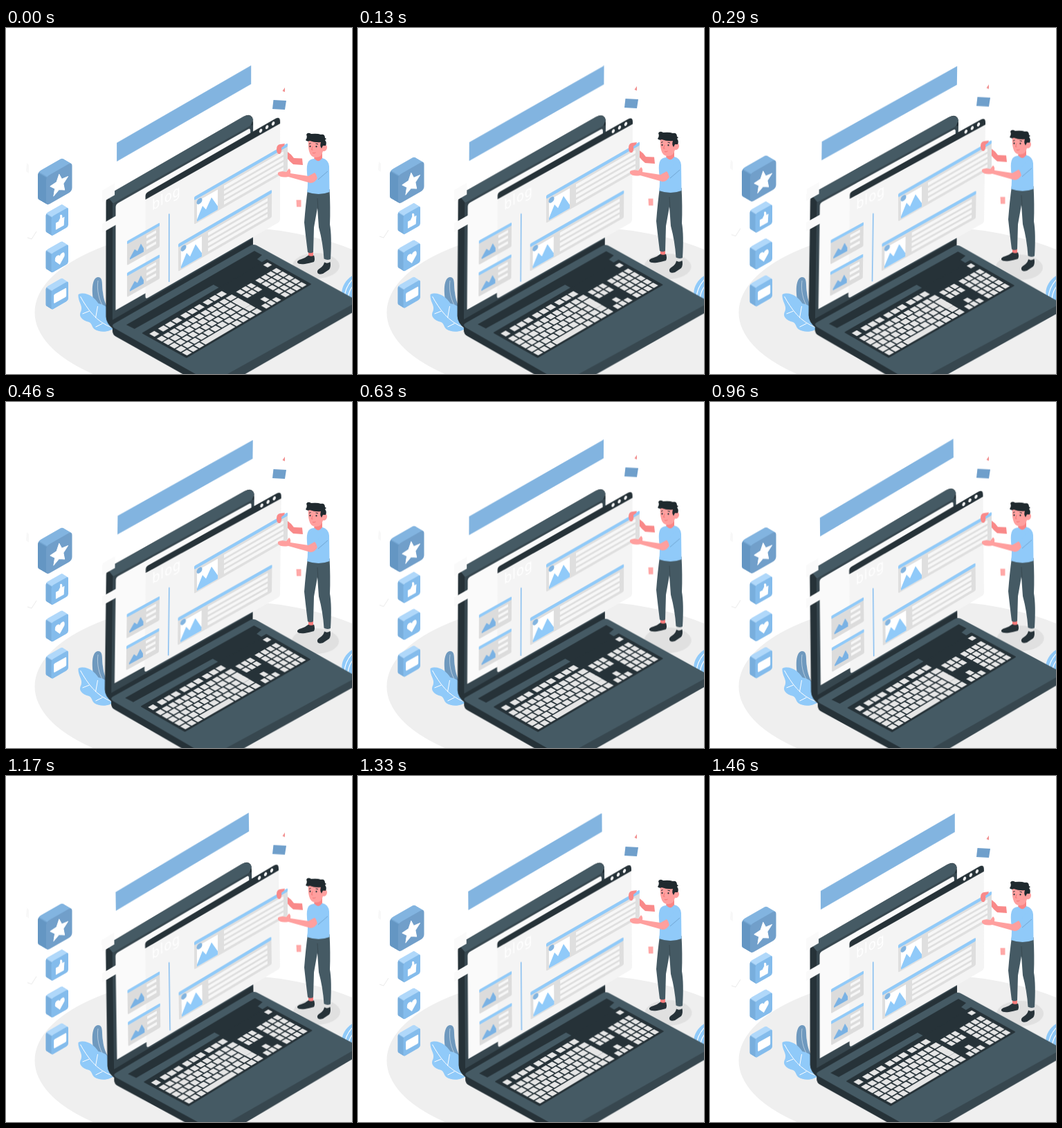
Animation, 500 px wide and 500 px high, one loop 1.5 s. Source, as an HTML page:

```html
<!DOCTYPE html>
<html lang="en">
<head>
<meta charset="utf-8">
<title>Page building</title>
<style>
  html, body { margin: 0; width: 100%; height: 100%; overflow: hidden; background: #fff; }
  svg { display: block; width: 100vw; height: 100vh; }
  #laptop { transform-origin: 283px 277px; }
</style>
</head>
<body>
<svg viewBox="0 0 500 500">
  <defs>
    <linearGradient id="dark" x1="0" y1="1" x2="1" y2="0">
      <stop offset=".48" stop-color="#6496c3"/><stop offset=".52" stop-color="#82b4e0"/>
    </linearGradient>
    <linearGradient id="pale" x1="0" y1="1" x2="1" y2="0">
      <stop offset=".48" stop-color="#78aedd"/><stop offset=".52" stop-color="#b0d8fa"/>
    </linearGradient>
  </defs>

  <ellipse cx="315" cy="411" rx="273.500" ry="123.500" fill="#efefef"/>

  <g id="plants">
    <path d="M126 392C123 374 126 360 133 360C141 360 138 372 140 382C141 392 144 400 148 406L136 408Z" fill="#6f99be"/>
    <path d="M133 365C131 378 134 394 142 405" fill="none" stroke="#fff" stroke-width=".8" opacity=".6"/>
    <g transform="translate(-.5 -1)">
      <path d="M105 386C115 381 128 389 134 399C145 401 152 408 153 420L160 432C151 441 137 442 128 436C123 431 126 427 117 425C107 421 106 415 109 410C112 402 104 396 105 386Z" fill="#90caf9"/>
      <path d="M108 389C118 407 131 426 154 434M121 410L111 414M130 420L133 403M140 428L130 433" fill="none" stroke="#fff" stroke-width="1"/>
    </g>
    <path d="M502 357C490 364 483 376 486 389L502 400Z" fill="#90caf9"/>
    <path d="M502 362Q490 374 489 390M502 372Q495 380 494 392" fill="none" stroke="#fff" stroke-width="1.2"/>
  </g>

  <g id="laptop">
    <ellipse cx="448" cy="343.500" rx="34" ry="18.500" fill="#e0e0e0"/>

    <!-- lid -->
    <path d="M144.500 252Q144.500 245 151 239L343 128Q357 121 357 137V318L156 436Q144.500 427 144.500 417Z" fill="#263238"/>
    <path d="M147 244Q149 241 152 238.500L343 128Q353 123 357 132L353 142L155 254Z" fill="#455a64"/>
    <path d="M154 254L353 141L357 140V304L154 422Z" fill="#37474f"/>
    <path d="M158.500 259Q158.500 255 162 253L350 146Q353 144 353 149V297L158.500 408Z" fill="#fafafa"/>

    <!-- base -->
    <path d="M154 430V438Q154 443 159 446L284 516L300 400Z" fill="#263238"/>
    <path d="M284 516H318L506 408V395L300 400Z" fill="#37474f"/>
    <path d="M157 427L352 315Q358 311 364 315L503 391Q508 395 503 398L304 509Q297 513 290 509L157 434Q151 430 157 427Z" fill="#455a64"/>
    <path d="M174 429L359 322L370 328L363 334L371 339L378 335L420 360L330 395L300 371L186 435Z" fill="#263238"/>
    <path d="M186 435L300 371L311 377L199 441Z" fill="#455a64"/>
    <path d="M198 441L377 335L440 370L261 476Z" fill="#263238" stroke="#263238" stroke-width="2" stroke-linejoin="round"/>
    <g id="keys" transform="matrix(179 -106 63 35 198 441)" fill="#e6e6e6"></g>

    <g transform="matrix(1 -.577 0 1 139 235)" fill="#fafafa">
      <rect width="18" height="17"/><rect y="48" width="20" height="13"/>
    </g>
    <path d="M160 166L354 54V81L160 193Z" fill="#82b4e0"/>

    <!-- front sheet -->
    <path d="M201.500 247L396 136V276Q396 280 392 282L205 390Q201.500 392 201.500 388Z" fill="#f4f4f4"/>
    <path d="M201.500 248V243Q201.500 239 205 237L389 131Q396 127 396 135V138Z" fill="#263238"/>
    <g fill="#fafafa">
      <ellipse cx="368" cy="148.500" rx="1.900" ry="3" transform="rotate(25 368 148.500)"/>
      <ellipse cx="377" cy="143.200" rx="1.900" ry="3" transform="rotate(25 377 143.200)"/>
      <ellipse cx="386" cy="138" rx="1.900" ry="3" transform="rotate(25 386 138)"/>
    </g>
    <text transform="matrix(.87 -.5 0 1 211 264)" font-family="'Noto Sans', sans-serif" font-size="21" letter-spacing="1" fill="#fff">blog</text>
    <path d="M235.700 268.500V367" stroke="#82bcf0" stroke-width="1.500"/>
    <g class="small"></g>
    <g class="small"></g>
    <g class="big" transform="matrix(1 -.58 0 1 249 312)"></g>
  </g>

  <g id="float">
    <g class="big" transform="matrix(1 -.575 0 1 272 244)"></g>

    <path d="M30 195L33 198V210L29 207Z" fill="#f8f8f8"/>
    <path d="M31 303L37 305L44 294" fill="none" stroke="#e4e4e4" stroke-width=".8"/>
    <path d="M399.500 91L403 86V92.500Z" fill="#f28f8f"/>
    <path d="M386.500 104L405 105L403 118L385 117Z" fill="#6f9fcb"/>
    <path d="M419.500 248.500H426.500V258.500H420Z" fill="#ffa8a7"/>

    <!-- man -->
    <path d="M437 322H444V331H437Z" fill="#f77c7c"/>
    <path d="M460 331H468V341H460Z" fill="#e0e0e0"/>
    <path d="M437 328.500Q441 331 445 328.500Q447 334 445 338Q438 340 432 341Q423 342 421 339Q420 336 427 334Q433 332 437 328.500Z" fill="#263238"/>
    <path d="M460 338.500Q464 341 468.500 338Q470 345 467 349L458 355Q451 357 450 353Q449 350 454 347Q459 344 460 338.500Z" fill="#263238"/>
    <path d="M436 233H467.500Q469 260 468 284Q471 300 469 334Q464 336 459.500 333.500Q458 310 452 288L450 260L445 288L444 324Q440 326.500 436 324Q433 300 431 281Q433 255 436 233Z" fill="#455a64"/>
    <path d="M450 246L451 262" stroke="#37474f" stroke-width=".8"/>
    <path d="M446 180H457V192Q451 199 445 192Z" fill="#f98585"/>
    <path d="M437 193Q440 189 446 189Q451 196 457 188Q466 190 467 200L467.500 237Q452 243 435 237Q437 225 435 210Q434 198 437 193Z" fill="#90caf9"/>
    <path d="M437 159Q447 153 459 161V169Q464 167 464 173Q463 179 458 178Q456 187 448 187Q440 187 438 178Q436 170 437 159Z" fill="#ff9f9e"/>
    <path d="M433 162Q436 158 434 154Q436 150 441 153Q450 152 455 154Q461 153 461 159L463 160L461 162Q464 165 462 170H458L456 174Q453 170 455 165Q447 166 439 163Q435 165 432 161Z" fill="#1f292e"/>
    <g fill="#263238">
      <ellipse cx="439.500" cy="171" rx="1" ry="1.300"/><ellipse cx="448.500" cy="171.300" rx="1" ry="1.300"/>
    </g>
    <path d="M438 167.500L440.500 166.500M447.500 167L451 168" fill="none" stroke="#263238" stroke-width="1"/>
    <path d="M443 171L441.500 176H443.500M443 180.500Q445 181.500 447.500 180" fill="none" stroke="#f06c6c" stroke-width=".8"/>
    <path d="M393 209Q397 206 405 208L409 203Q412 205 411 210L437 214L446 209L451 215Q447 224 440 224L408 215Q397 217 393 212Z" fill="#ff9f9e"/>
    <path d="M447 208L461 195Q469 198 466 208L451 221Q449 214 447 208Z" fill="#90caf9"/>
    <path d="M451 219L465 207" fill="none" stroke="#6fa3d0" stroke-width=".9"/>
    <path d="M391 175Q391 169 396 168L403 167L402 170L398 173Q399 179 396 182Q391 183 391 175Z" fill="#f98989"/>
    <path d="M407 179L412 183L416 188L428 188.500L429 198L415 197Q410 193 407 189Z" fill="#f98989"/>
  </g>
</svg>
<script>
const $$ = s => document.querySelectorAll(s);
const rect = (x, y, w, h, fill, more = '') =>
  `<rect x="${x}" y="${y}" width="${w}" height="${h}" fill="${fill}" ${more}/>`;
const path = (d, fill) => `<path d="${d}" fill="${fill}"/>`;
const float = document.getElementById('float');

// Cards are drawn flat and sheared by their group.
const stripes = (x, y, w, n, step, h) =>
  Array.from({ length: n }, (_, i) => rect(x, y + i * step, w, h, '#f7f7f7')).join('');

$$('.big').forEach(g => g.innerHTML =
  rect(0, 0, 135, 40, '#dedede', 'rx="2" opacity=".95"') +
  rect(0, 0, 135, 5, '#90caf9', 'rx="1.5"') +
  rect(4, 9, 30, 29, '#fff') +
  '<circle cx="7.500" cy="10.500" r="4" fill="#82b4e0"/>' +
  path('M4 38V35L12 20L17 28L25 15L34 33V38Z', '#90caf9') +
  stripes(43, 8.5, 86, 4, 7.6, 4.6));

$$('.small').forEach((g, i) => {
  g.setAttribute('transform', `matrix(1 -.565 0 1 175 ${308 + i * 46})`);
  g.innerHTML = rect(0, 0, 47, 35, '#dcdcdc', 'rx="1.5"') +
    rect(0, 0, 47, 4.5, '#90caf9', 'rx="1"') +
    path('M4 29V27L11 18L15 23L20 15L24 24V29Z', '#7ab2e4') +
    stripes(28, 8, 14, 3, 8, 4);
});

// Keyboard blocks in unit space: u along the row, v across the rows.
function keyRow(u, v, w, n, h = .118) {
  const step = w / n;
  let out = '';
  for (let i = 0; i < n; i++) out += rect(u + i * step, v, step - .01, h, '#e6e6e6');
  return out;
}
const top0 = .275, rowH = .144;
let keys = keyRow(.02, .09, .05, 1) + keyRow(.95, .06, .045, 1, .1);
for (let i = 0; i < 3; i++) keys += keyRow(.09 + i * .18, .09, .165, 3);
for (let r = 0; r < 5; r++) {
  const v = top0 + r * rowH;
  if (r < 4) keys += keyRow(.015, v, .555, 11 - r % 2) + keyRow(.57, v, .06, 1);
  else keys += keyRow(.015, v, .15, 3) + keyRow(.165, v, .25, 1) + keyRow(.415, v, .215, 4);
  if (r < 2 || r === 4) keys += keyRow(.655, v, .13, 3);
  if (r === 3) keys += keyRow(.698, v, .044, 1);
  keys += keyRow(.81, v, .18, 4);
}
keys += rect(.57, top0 + rowH, .05, rowH * 2, '#e6e6e6');
document.getElementById('keys').innerHTML = keys;

// A rounded face extruded from its back corner (x, y) by (a, b).
function tile(x, y, a, b, w, h, r, edge, front, icon) {
  const slope = -.57, steps = 24;
  const face = (t, fill) =>
    `<g transform="matrix(1 ${slope} 0 1 ${x + a * t} ${y + b * t})">${rect(0, 0, w, h, fill, `rx="${r}"`)}</g>`;
  let out = '';
  for (let i = 0; i < steps; i++) out += face(i / steps, `url(#${edge})`);
  const cx = x + a + w / 2, cy = y + b + (w * slope + h) / 2;
  return out + face(1, front) +
    `<g transform="matrix(.9 -.5 0 1 ${cx} ${cy})" fill="#fff" stroke="#fff" stroke-linejoin="round">${icon}</g>`;
}
const star = Array.from({ length: 10 }, (_, i) => {
  const r = i % 2 ? 7.2 : 15, a = i * Math.PI / 5;
  return [r * Math.sin(a), 1 - r * Math.cos(a)].map(n => n.toFixed(2));
}).join(' ');
const icons = [
  '<path d="M-6 -1H-3V8H-6ZM-2 -1L1 -5V-9Q4 -9 3.500 -3H7L6 8H-2Z"/>',
  '<path d="M0 8L-7 0Q-8 -6 -4 -6Q-1 -6 0 -3Q1 -6 4 -6Q8 -6 7 0Z"/>',
  '<rect x="-9" y="-5.500" width="19" height="12" rx="1"/>'
];
let tiles = tile(46, 208, 12, 7, 37.5, 42, 5, 'dark', '#719fca', `<polygon points="${star}"/>`);
icons.forEach((icon, i) => tiles += tile(57.5, 268 + i * 53.3, 8, 5, 24.5, 28, 3, 'pale', '#84bcec', icon));
float.insertAdjacentHTML('afterbegin', tiles);

const loop = { duration: 1500, iterations: Infinity, delay: -20 };
float.animate([0.3, -11, 0.3].map(y => ({ transform: `translateY(${y}px)` })), loop);
document.getElementById('laptop').animate(
  [[0, 0], [.25, 1], [.75, -1], [1, 0]].map(([offset, a]) => ({ offset, transform: `rotate(${a}deg)` })), loop);
</script>
</body>
</html>
```
